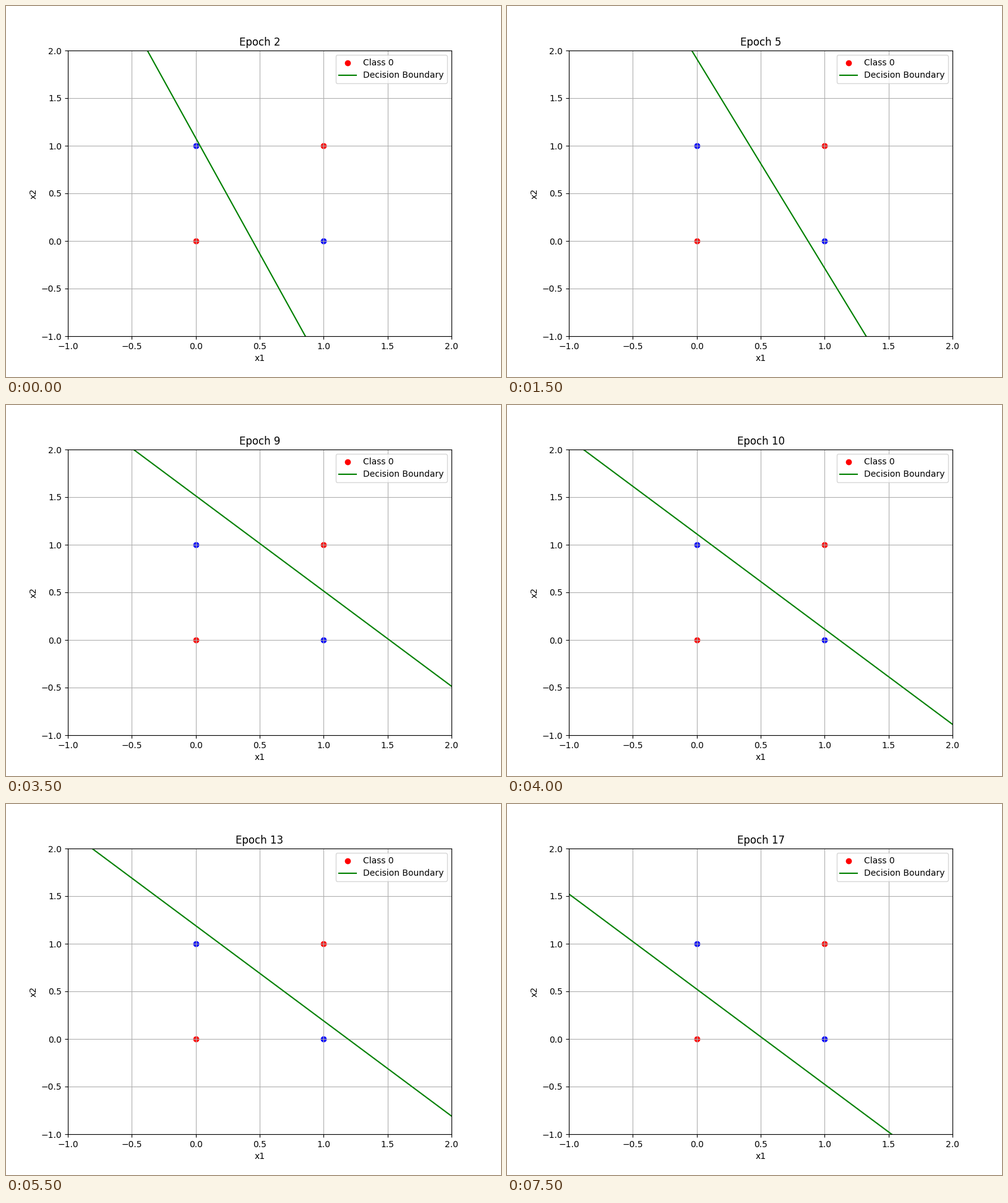
A matplotlib script for the animation above (8 s loop, 800x600 px).

```python
import numpy as np
import matplotlib.pyplot as plt
from matplotlib.animation import FuncAnimation

FIRST_EPOCH = 2
EPOCHS = 16
RATE = 2
MARGIN = 0.57  # activation level at which the boundary is drawn

POINTS = [(0, 0), (0, 1), (1, 0), (1, 1)]


def features(x1, x2):
    return np.array([x1, x2, x1 * x2, 1.0])


def train_epoch(w):
    """One perceptron pass over XOR with an added product feature."""
    for x1, x2 in POINTS:
        f = features(x1, x2)
        error = (x1 ^ x2) - int(w @ f > 0)
        w = w + RATE * error * f
    return w


# Weights for x1, x2, x1*x2 and bias; the tiny excess on x2 breaks ties
history = [np.array([17, 7.001, 17, -7])]
while len(history) < EPOCHS:
    history.append(train_epoch(history[-1]))

fig, ax = plt.subplots(figsize=(8, 6), dpi=100)
xs = np.array([-1.0, 2.0])

for x1, x2 in POINTS:
    label = "Class 0" if x1 == x2 == 0 else None
    ax.scatter(x1, x2, color="blue" if x1 ^ x2 else "red", label=label)
boundary, = ax.plot([], [], color="green", label="Decision Boundary")

ax.set(xlim=(-1, 2), ylim=(-1, 2), xlabel="x1", ylabel="x2")
title = ax.set_title("")
ax.grid(True)
ax.legend(loc="upper right")


def update(i):
    w1, w2, _, bias = history[i]
    boundary.set_data(xs, (MARGIN - bias - w1 * xs) / w2)
    title.set_text(f"Epoch {FIRST_EPOCH + i}")
    return boundary, title


anim = FuncAnimation(fig, update, frames=EPOCHS, interval=500,
                     repeat=True, repeat_delay=0)
plt.show()
```
